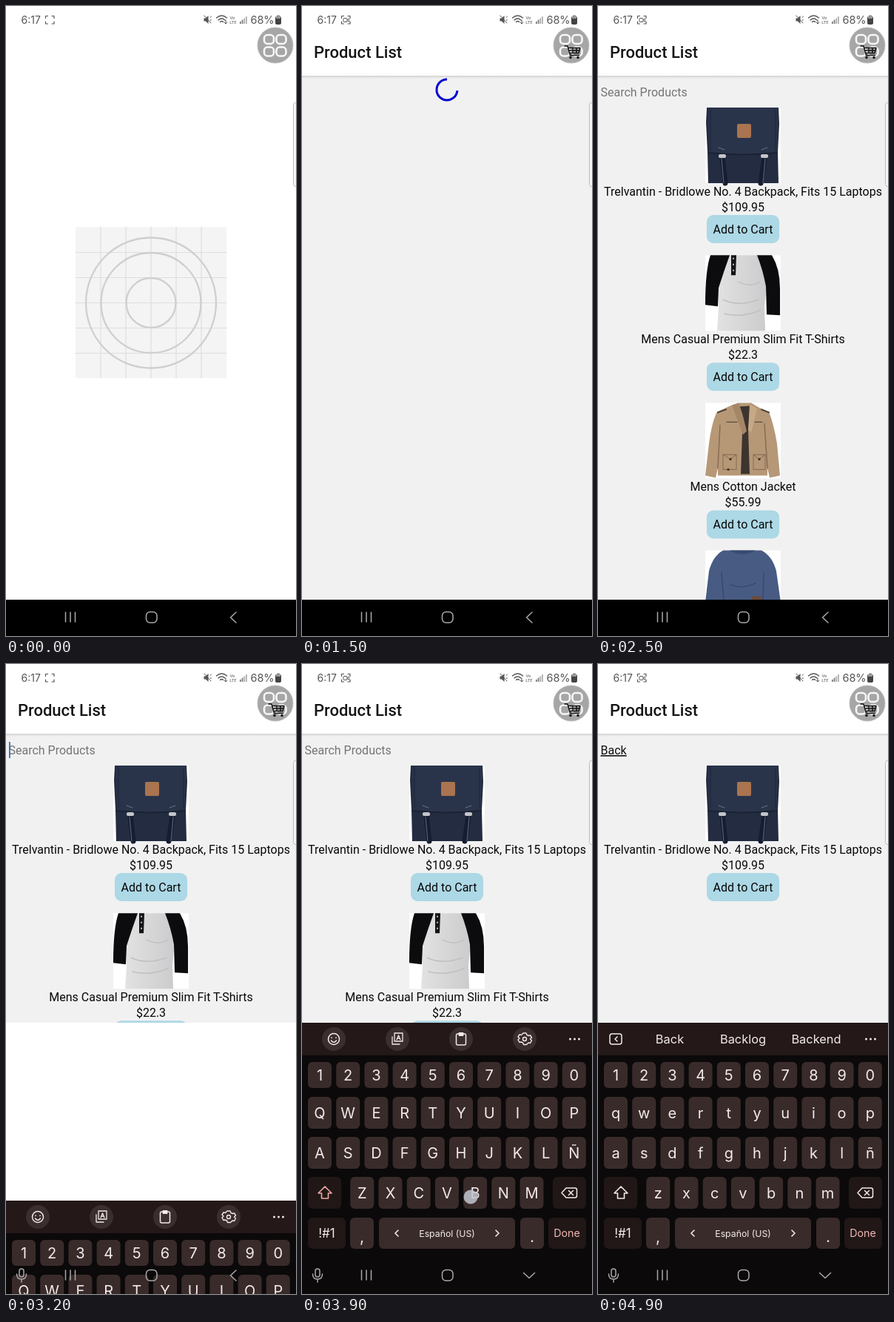
Animation of 392 by 850 pixels, one loop 5000 ms. Source, as an HTML page:

```html
<!DOCTYPE html>
<html lang="en">
<head>
<meta charset="utf-8">
<title>Product list</title>
<style>
  html, body { margin: 0; width: 100%; height: 100%; overflow: hidden; background: #fff; }
  svg { display: block; text-anchor: middle; font-family: Roboto, sans-serif; }
  .ui { font-family: Inter, Roboto, sans-serif; }
  .left { text-anchor: start; }
  .line { fill: none; stroke-linecap: round; stroke-linejoin: round; }
</style>
</head>
<body>
<svg id="stage" width="392" height="850" viewBox="0 0 392 850"></svg>
<script>
const stage = document.getElementById('stage');
const $ = id => document.getElementById(id);
const show = (id, on) => $(id).setAttribute('display', on ? 'inline' : 'none');

// Markup helpers
const rect = (x, y, w, h, fill, r = 0, more = '') =>
  `<rect x="${x}" y="${y}" width="${w}" height="${h}" rx="${r}" fill="${fill}" ${more}/>`;
const circle = (x, y, r, fill, more = '') => `<circle cx="${x}" cy="${y}" r="${r}" fill="${fill}" ${more}/>`;
const shape = (d, fill) => `<path d="${d}" fill="${fill}"/>`;
const line = (d, color, w = 1.5, more = '') =>
  `<path class="line" d="${d}" stroke="${color}" stroke-width="${w}" ${more}/>`;
const text = (x, y, str, size, fill, more = '') =>
  `<text x="${x}" y="${y}" font-size="${size}" fill="${fill}" ${more}>${str}</text>`;
const group = (id, body, more = '') => `<g id="${id}" ${more}>${body}</g>`;
const fade = (id, from, to, more) =>
  `<linearGradient id="${id}" ${more}><stop stop-color="${from}"/><stop offset="1" stop-color="${to}"/></linearGradient>`;

// Product pictures, each 102 px square
const backpack =
  shape('M2 0H99L100 22L98 60L99 102H4L3 60L1 20Z', '#232c40') +
  shape('M4 0H98L97 60Q50 66 5 60Z', '#29344a') +
  line('M4 61Q50 66 97 61', '#182032', 1.4) +
  line('M7 3V58M95 3V58', '#1f283b', 1.2) +
  line('M18 54l8 3M84 54l-8 3', '#69728a', 1) +
  line('M23 68L27 102M80 68L75 102', '#151d2f', 7) +
  line('M22 69L25 102M81 69L78 102', '#526080', 1.2) +
  rect(18, 63, 10, 5, '#c3c5c8', 2) + rect(75, 63, 10, 5, '#c3c5c8', 2) +
  rect(43, 22, 19, 19, '#a9744f', 2);
const shirt =
  shape('M28 0H74L84 30L80 70L81 102H16L18 70L17 32Z', 'url(#heather)') +
  shape('M7 0H33Q25 22 18 44L17 69L0 67Q0 20 7 0Z', '#0c0c0e') +
  shape('M70 0H90Q101 18 101 45V81L83 80L82 42Q78 20 70 0Z', '#0c0c0e') +
  shape('M35 0H42L41 27H35Z', '#151517') +
  line('M38 4V5M38 12V13M38 20V21', '#ddd', 1.6) +
  line('M24 60Q45 70 72 60M26 79Q50 85 75 74M45 36Q60 44 74 36', '#c0c0c2', 1.5);
const jacket =
  shape('M36 3L46 0H62L74 7L86 12Q93 30 97 55L101 98L87 101L84 88V98H17V88L14 101L0 98L5 55Q9 25 16 12Z', '#b69877') +
  shape('M45 5L60 4L66 10L58 35L60 96H48L50 40Z', '#3b342f') +
  shape('M36 3L45 0L50 14L56 38L51 43Z', '#a58768') +
  shape('M60 2L70 8L62 40L58 36Z', '#c7a988') +
  line('M17 88L20 30M84 88L80 28', '#876d53', 1.5) +
  line('M17 13L28 9M76 9L86 13', '#4a3e35', 2) +
  line('M29 26H43M67 26H77', '#5d4c3c', 1.2) +
  line('M24 70H42V90H24ZM65 70H81V90H65ZM24 70L34 76L42 70M65 70L73 76L81 70', '#8b7055', 1.1) +
  circle(34, 76, 1.6, '#403229') + circle(73, 76, 1.6, '#403229') + circle(31, 90, 1.6, '#403229');
const sweater =
  shape('M24 0H76Q91 8 96 28L102 70V102H0V70L5 28Q10 8 24 0Z', '#485b83') +
  shape('M33 0H68Q50 10 33 0Z', '#384a70') +
  line('M25 68L22 30M78 68L79 30M34 46Q50 53 68 44', '#384a70', 1.5) +
  rect(63, 62, 13, 6, '#6c4b3c', 1);

const products = [
  [backpack, 'Trelvantin - Bridlowe No. 4 Backpack, Fits 15 Laptops', '$109.95'],
  [shirt, 'Mens Casual Premium Slim Fit T-Shirts', '$22.3'],
  [jacket, 'Mens Cotton Jacket', '$55.99'],
  [sweater, 'Mens Casual Slim Fit', '$15.99'],
];
const card = ([art, name, price], i) => group('card' + i,
  `<g id="art${i}" transform="translate(145 137)">${rect(0, 0, 102, 102, '#fff')}${art}</g>` +
  text(196, 256, name, 16, '#080808') +
  text(196, 277, price, 16, '#080808') +
  rect(147, 282, 98, 38, '#add8e6', 9) +
  text(196, 307, 'Add to Cart', 16, '#080808'), `transform="translate(0 ${i * 199.2})"`);

// Keyboard
const INK = '#f2eaea', KEY = '#3a2b2b', DARK = '#211717';
const colX = i => 24 + i * 38.2;
const key = (cx, y, h, label, size = 20) =>
  rect(cx - 16, y, 32, h, KEY, 6) + text(cx, y + h / 2 + size * .36, label, size, INK);
const rows = [['qwertyuiop', 0, 584], ['asdfghjklñ', 0, 638], ['zxcvbnm', 1.5, 692]];
const letters = toCase => rows.map(([chars, first, y]) =>
  [...chars].map((c, i) => key(colX(i + first), y, 43, toCase(c))).join('')).join('');
const shift = color => line('M31 705l9 9h-4.5v7h-9v-7h-4.5z', color, 1.6);

const toolbar = [43, 129, 215, 301].map(x => circle(x, 506, 16, '#3b2e2e')).join('') +
  circle(43, 506, 7.5, 'none', `stroke="${INK}" stroke-width="1.5"`) +
  line('M40 504v.5M46 504v.5M39.5 508Q43 512.5 46.5 508', INK) +
  line('M125 498h11v11h-11zM122 503v10h10M128 507l2.5-6l2.5 6M129 505h3', INK, 1.3) +
  rect(208.5, 499, 13, 15, 'none', 2, `stroke="${INK}" stroke-width="1.5"`) +
  rect(211.5, 497, 7, 5, INK, 1) +
  line('M299 498h4l1 2.5l2.5 1l2-.5l2 3l-2 2l2 2l-2 3.5l-2.5-.5l-2.5 2.5h-4l-1-2.5l-2.5-1l-2 .5l-2-3.5l2-2l-2-2l2-3l2.5.5z', INK, 1.4) +
  circle(301, 506, 2.5, 'none', `stroke="${INK}" stroke-width="1.4"`);
const suggestions = rect(16, 499, 16, 14, 'none', 3, `stroke="${INK}" stroke-width="1.5"`) +
  line('M26 503l-3 3l3 3', INK) +
  [97, 196, 295].map((x, i) => text(x, 512, '', 16.4, INK, `id="word${i}"`)).join('');

const keyboard =
  rect(0, 484, 392, 366, '#0b0909') + rect(0, 484, 392, 44, '#241818') +
  [362.5, 368.5, 374.5].map(x => circle(x, 506, 1.5, INK)).join('') +
  [...'1234567890'].map((c, i) => key(colX(i), 537, 35, c)).join('') +
  rect(8, 692, 45, 43, DARK, 6) + rect(339, 692, 45, 43, DARK, 6) +
  line('M357 707h12q2.5 0 2.5 2.5v8q0 2.5-2.5 2.5h-12l-6-6.5zM360.5 710.5l6 6m0-6l-6 6', INK) +
  rect(8, 747, 51, 42, DARK, 6) + text(33.5, 774, '!#1', 17, INK) +
  key(81, 747, 42, '') + text(81, 780, ',', 21, INK) +
  rect(104, 747, 184, 42, KEY, 6) + text(196, 773, 'Español (US)', 12.3, INK) +
  line('M130 764l-4 4l4 4M262 764l4 4l-4 4', INK, 1.6) +
  key(311, 747, 42, '') + text(311, 780, '.', 21, INK) +
  rect(333, 747, 51, 42, DARK, 6) + text(358, 773, 'Done', 14.3, '#f0b9b3') +
  group('upper', toolbar + letters(c => c.toUpperCase()) + shift('#f0a9a3')) +
  group('lower', suggestions + letters(c => c) + shift(INK));

// Status bar, floating button and navigation icons
const GREY = '#555';
const status =
  text(20.5, 23.5, '6:17', 14, GREY, 'class="ui left"') +
  line('M56.5 13.5h-3v3M62 13.5h3v3M56.5 24h-3v-3M62 24h3v-3', GREY, 1.2) +
  group('rec', rect(56, 16.5, 5, 5, 'none', 1, `stroke="${GREY}"`) + line('M61 19l2.5-2v4z', GREY, .8)) +
  shape('M267.5 16.5h2.5l3.5-3.500v11l-3.5-3.500h-2.5z', GREY) + line('M268 13l9 10M276 15.5l1.5-1.500M276 19h1.500', GREY, 1) +
  line('M284.5 16q7-6 14 0M287 19q4.5-4 9 0M289.5 21.5q2-2 4 0', GREY, 1.4) +
  line('M297 19v5M295 22l2 2l2-2', GREY, 1) +
  text(306, 17.5, 'Vo', 6, GREY) + text(307, 24, 'LTE', 6, GREY) +
  [0, 1, 2, 3].map(i => rect(316 + i * 2.7, 21 - i * 2.3, 1.7, 3 + i * 2.3, i < 2 ? '#777' : '#aaa')).join('') +
  text(346.5, 23.5, '68%', 14.5, GREY, 'class="ui"') +
  rect(364, 14, 8, 11, '#444', 2) + rect(366, 12.5, 4, 2, '#888') + rect(365, 14, 6, 3, '#999');
const floating = circle(364, 53, 24, '#000', 'fill-opacity=".35" stroke="#bbb" stroke-width="1"') +
  [[349, 39], [365.5, 39], [349, 55.5], [365.5, 55.5]].map(([x, y]) =>
    rect(x, y, 13, 12, 'none', 4.5, 'stroke="#fff" stroke-opacity=".9" stroke-width="2.6"')).join('');
const cart = line('M355 54h4l3.5 12.5h12M360 56.5h16l-2 7h-12M361 60h14M366 57v6M371 57v6', '#111', 1.5) +
  circle(363, 69.5, 1.7, '#111') + circle(373, 69.5, 1.7, '#111');
const NAV = '#a9a9a9';
const navIcons = line('M80.5 818v13M87 818v13M93.5 818v13', NAV) +
  rect(189.5, 817.5, 14.5, 14.5, 'none', 5, `stroke="${NAV}" stroke-width="1.5"`) +
  line('M311 818l-7.5 7l7.5 7', NAV, 1.5, 'id="back"') +
  line('M299.5 821.5l7.5 7l7.5-7', NAV, 1.5, 'id="hide"') +
  group('mic', rect(18, 816, 6, 11, 'none', 3, `stroke="${NAV}" stroke-width="1.5"`) +
    line('M14.5 823q0 7 6.5 7t6.5-7M21 830v4', NAV));

const gridLines = [128, 162, 196, 230, 264].map(p => `M${p} 298v204M94 ${p + 204.5}h204`).join('');
const splash = rect(94, 298, 204, 204, '#f4f4f4') + line(gridLines, '#dedede', 1.2) +
  [88, 67.5, 33.5].map(r => circle(196, 400.5, r, 'none', 'stroke="#cfcfcf" stroke-width="2.3"')).join('');

stage.innerHTML =
  fade('shade', '#d2d2d2', '#f1f1f1', 'x2="0" y2="1"') +
  fade('heather', '#e2e2e2', '#cbcbcd', '') +
  rect(0, 0, 392, 850, '#fff') +
  group('splash', splash) +
  group('app',
    `<svg id="page" y="94" width="392" height="707"><g transform="translate(0 -94)">` +
    rect(0, 94, 392, 756, '#f1f1f1') + rect(0, 94, 392, 4, 'url(#shade)') +
    circle(196, 113, 14, 'none', 'id="spinner" stroke="#0505d2" stroke-width="3" pathLength="360"') +
    group('list', text(3.5, 122, '', 16, '#000', 'id="query" class="left"') +
      rect(4, 105, 1.8, 22, '#3d6bb5', 0, 'id="caret"') + products.map(card).join('')) +
    `</g></svg>` +
    text(16, 70, 'Product List', 22, '#141414', 'class="left" font-weight="500"')) +
  rect(0, 801, 392, 49, '#000') +
  group('keyboard', keyboard, 'class="ui"') +
  navIcons + status + floating + group('cart', cart) +
  rect(388.5, 130.5, 8, 113, '#f7f7f7', 3, 'stroke="#bbb"') +
  circle(0, 0, 9.5, '#c3c6cf', 'id="touch" fill-opacity=".85"');

const clamp = v => Math.max(0, Math.min(1, v));
const words = [[], ['B', 'Be', 'By'], ['Ba', 'Back', 'Bad'], ['Bac', 'Back', 'Bacon'], ['Back', 'Backlog', 'Backend']];
const typedAt = [4000, 4100, 4200, 4400];
const touches = [[3900, 228, 719], [4050, 24, 662], [4150, 158, 716], [4300, 291, 662]];

function draw(t) {
  const loaded = t >= 1600, editing = t >= 3100;
  const typed = typedAt.filter(at => t >= at).length;

  show('splash', t < 1000);
  show('app', t >= 1000);
  show('cart', t >= 1000);
  show('rec', t >= 500 && !(t >= 3000 && t < 3500));

  // The spinner arc grows while its tail turns
  const p = clamp((t - 1000) / 500), grow = p * p * (3 - 2 * p);
  show('spinner', !loaded);
  $('spinner').setAttribute('stroke-dasharray', `${10 + 255 * grow} 360`);
  $('spinner').setAttribute('transform', `rotate(${95 * p - 90} 196 113)`);

  // The first picture takes longer to reach full strength
  show('list', loaded);
  const appear = clamp((t - 1600) / 300), settle = .87 + .13 * clamp((t - 1900) / 600);
  products.forEach((_, i) => {
    $('art' + i).setAttribute('opacity', i ? appear : appear * settle);
    show('card' + i, !i || !typed);
  });
  $('page').setAttribute('height', editing ? 390 : 707);

  const query = $('query');
  query.textContent = typed ? 'Back'.slice(0, typed) : 'Search Products';
  query.setAttribute('fill', typed ? '#111' : '#757575');
  query.setAttribute('text-decoration', typed ? 'underline' : 'none');
  show('caret', (editing && t < 3500) || (t >= 4000 && t < 4800));
  $('caret').setAttribute('x', typed ? 3.5 + query.getComputedTextLength() : 4);

  const rest = 1 - clamp((t - 3130) / 370);
  show('keyboard', editing);
  $('keyboard').setAttribute('transform', `translate(0 ${Math.floor(366 * rest * rest)})`);
  show('upper', !typed);
  show('lower', typed);
  words[typed].forEach((word, i) => $('word' + i).textContent = word);
  show('mic', t >= 3200);
  show('back', t < 3300);
  show('hide', t >= 3300);

  const touch = touches.find(([at]) => t >= at && t < at + 100);
  show('touch', touch);
  if (touch) $('touch').setAttribute('transform', `translate(${touch[1]} ${touch[2]})`);
}

function tick() {
  draw(Math.floor(performance.now() % 5000 / 100) * 100);
  requestAnimationFrame(tick);
}
tick();
</script>
</body>
</html>
```
